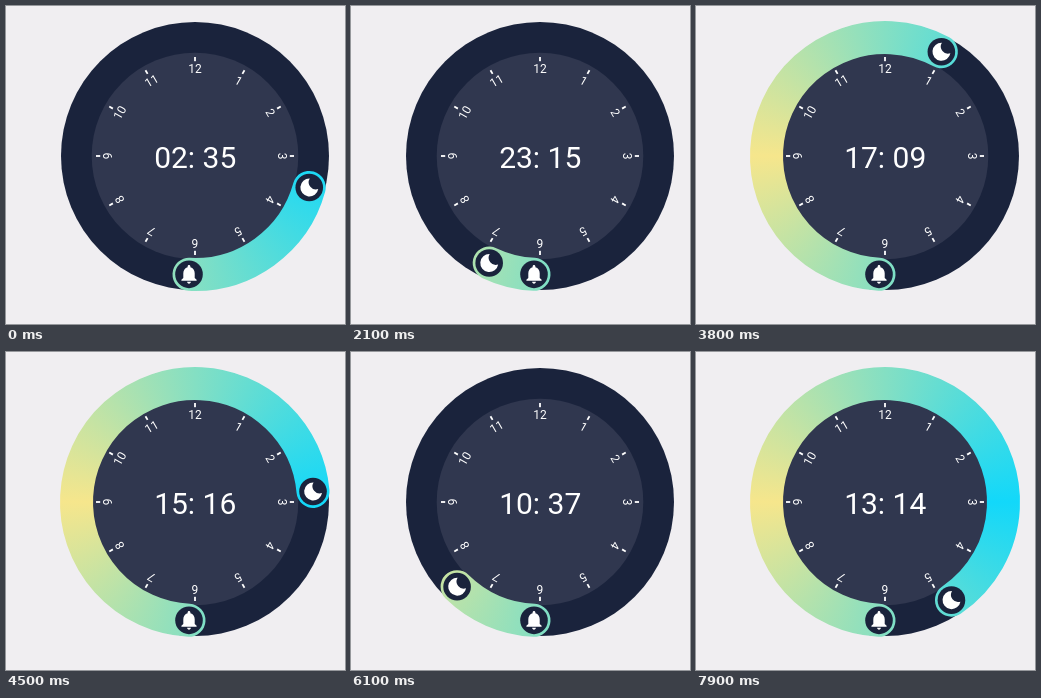
These frames come from a looping animation (339 by 318 pixels, 8000 ms). An HTML page with a canvas:

```html
<!DOCTYPE html>
<html lang="en">
<head>
<meta charset="utf-8">
<title>Sleep dial</title>
<style>
html, body { margin: 0; width: 100%; height: 100%; overflow: hidden; background: #f0eef1; }
canvas { display: block; }
</style>
</head>
<body>
<canvas id="dial" width="339" height="318"></canvas>
<script>
const ctx = document.getElementById('dial').getContext('2d');
const CX = 189, CY = 150, TRACK = 118.5, BELL = 182.9, LOOP = 8000, STEP = 100;
const NAVY = '#1a233c', FACE = '#30374f', CYAN = '#12d8fa', YELLOW = '#f6e68c';

// Drag path of the moon: [ms, degrees past the bell]
const drag = [
  [0, -77.5], [900, -50.5], [1100, -44], [2100, 22.5], [2700, 79], [3600, 191.5],
  [3800, 205.5], [4500, 262], [5200, 303.5], [6100, 401.5], [6650, 438], [7200, 396], [7900, 323]
];

const moonIcon = new Path2D('M.5-9A9 9 0 1 0 9 1.5A7.2 7.2 0 0 1 .5-9z');
const bellIcon = new Path2D('M0 9.3c1 0 1.9-.8 1.9-1.9h-3.8c0 1.1.9 1.9 1.9 1.9z' +
  'M5.7 3.6v-4.8c0-2.9-1.5-5.3-4.3-6v-.6C1.4-8.6.8-9.3 0-9.3s-1.4.7-1.4 1.5v.6' +
  'C-4.1-6.5-5.7-4.1-5.7-1.2v4.8l-1.9 1.9v.9h15.2v-.9z');

const sweep = ctx.createConicGradient(0, CX, CY);
[[0, CYAN], [.5, YELLOW], [1, CYAN]].forEach(s => sweep.addColorStop(...s));

const rad = deg => (deg - 90) * Math.PI / 180;

function slope(i) {
  const a = drag[Math.max(i - 1, 0)], b = drag[Math.min(i + 1, drag.length - 1)];
  return (b[1] - a[1]) / (b[0] - a[0]);
}

// Cubic Hermite curve through the drag points
function offsetAt(t) {
  let i = 0;
  while (i < drag.length - 2 && t >= drag[i + 1][0]) i++;
  const [t0, a] = drag[i], [t1, b] = drag[i + 1];
  const h = t1 - t0, u = (t - t0) / h, v = 1 - u;
  return a * v * v * (1 + 2 * u) + b * u * u * (3 - 2 * u) +
    h * u * v * (slope(i) * v - slope(i + 1) * u);
}

function disc(x, y, r, color) {
  ctx.fillStyle = color;
  ctx.beginPath();
  ctx.arc(x, y, r, 0, 2 * Math.PI);
  ctx.fill();
}

function label(text, x, y, size) {
  ctx.font = `${size}px Roboto, sans-serif`;
  ctx.fillText(text, x, y);
}

function drawFace() {
  disc(CX, CY, 134, NAVY);
  disc(CX, CY, 103.3, FACE);
  ctx.fillStyle = '#fff';
  ctx.textAlign = 'center';
  for (let h = 1; h <= 12; h++) {
    ctx.save();
    ctx.translate(CX, CY);
    ctx.rotate(h * Math.PI / 6);
    ctx.fillRect(-.9, -99, 1.8, 4.2);
    label(h, 0, -82.7, 12);
    ctx.restore();
  }
}

function drawArc(from, to) {
  ctx.strokeStyle = sweep;
  ctx.lineWidth = 33;
  ctx.lineCap = 'round';
  ctx.beginPath();
  ctx.arc(CX, CY, TRACK, rad(from), rad(to));
  ctx.stroke();
}

function drawKnob(deg, icon) {
  const x = CX + TRACK * Math.cos(rad(deg)), y = CY + TRACK * Math.sin(rad(deg));
  disc(x, y, 13.8, NAVY);
  ctx.save();
  ctx.translate(x, y);
  ctx.fillStyle = '#fff';
  ctx.fill(icon);
  ctx.restore();
}

function draw(t) {
  const off = offsetAt(t);
  const minutes = (Math.round(-off * 2) + 2880) % 1440;
  const pad = n => String(n).padStart(2, '0');
  ctx.fillStyle = '#f0eef1';
  ctx.fillRect(0, 0, 339, 318);
  drawFace();
  label(`${pad(Math.floor(minutes / 60))}: ${pad(minutes % 60)}`, CX + .2, 162, 30);
  if (off < 0) drawArc(BELL + off, BELL);
  else drawArc(BELL, BELL + off % 360);
  drawKnob(BELL, bellIcon);
  drawKnob(BELL + off, moonIcon);
}

const start = performance.now();
function tick() {
  const t = (performance.now() - start) % LOOP;
  draw(Math.floor(t / STEP) * STEP);
  requestAnimationFrame(tick);
}
tick();
</script>
</body>
</html>
```
